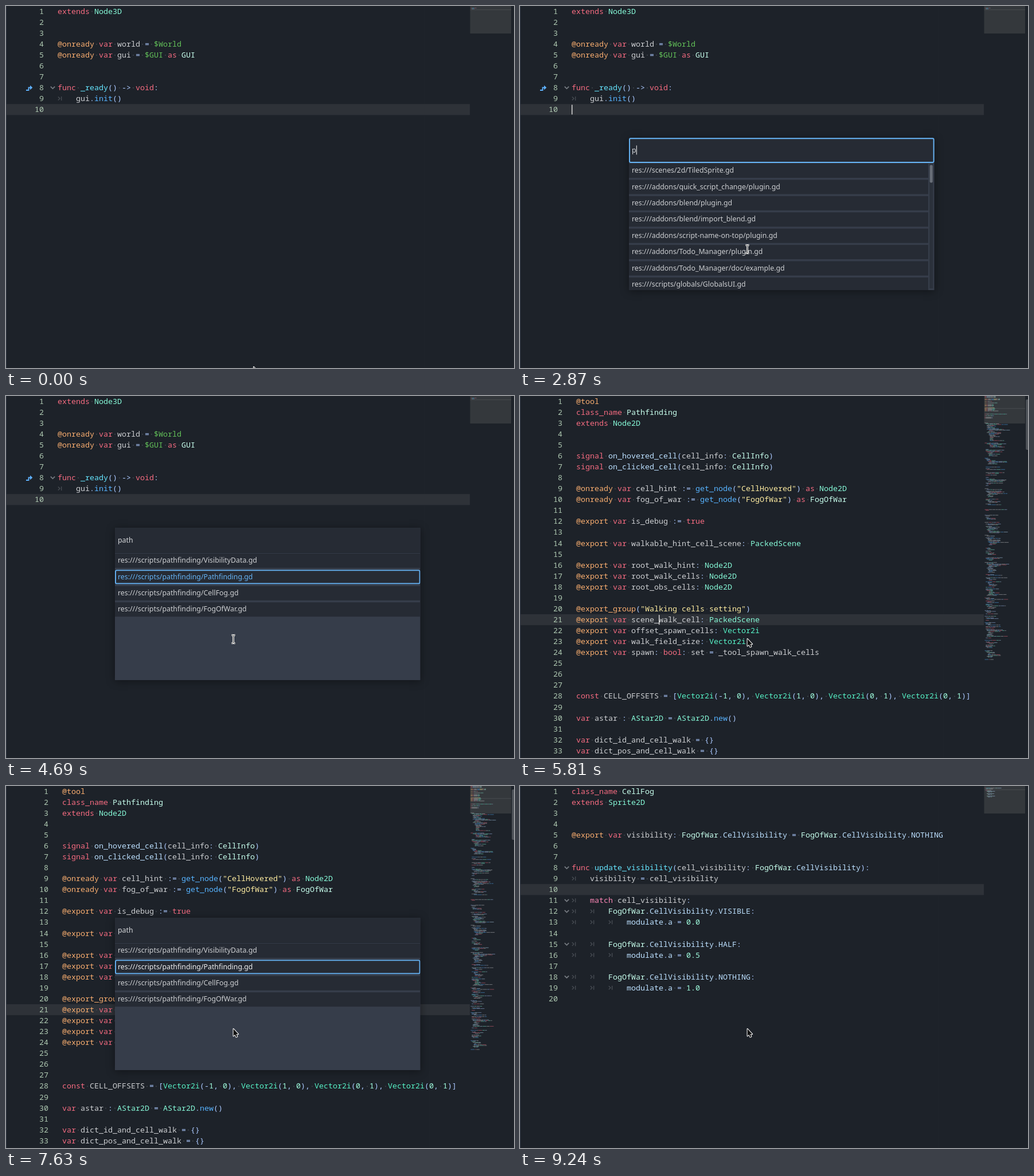
An HTML page with a canvas that plays this animation: 886x632 px, repeating every 9.31 s.

```html
<!DOCTYPE html>
<html lang="en">
<head>
<meta charset="utf-8">
<title>Quick script change</title>
<style>
  html, body { margin: 0; width: 100%; height: 100%; overflow: hidden; background: #1d2229; }
  canvas { display: block; }
</style>
</head>
<body>
<canvas id="stage" width="886" height="632"></canvas>
<script>
const ctx = document.getElementById('stage').getContext('2d');
const LOOP = 9310, TICK = 70;
const CHAR = 8, LINE = 19.07, TAB = 4;
const MONO = '13.333px "Noto Sans Mono", "DejaVu Sans Mono", monospace';
const SANS = '12.34px "Noto Sans", "Open Sans", sans-serif';

const C = {
  bg: '#1d2229', base: '#363d4a', field: '#262b34', accent: '#66b4f6',
  text: '#cdcfd2', keyword: '#f56b80', flow: '#fa85b4', base_type: '#56f2c6',
  engine: '#86fad8', user: '#c7ffed', string: '#ffeda1', symbol: '#abc9ff',
  call: '#57b3ff', def: '#66e6ff', member: '#bce0ff', number: '#a1ffe0',
  annotation: '#f8ad6f', node: '#63c259', lineNo: '#aec8b1', space: '#484d54'
};

const words = {};
const classify = (kind, list) => list.split(' ').forEach(w => { words[w] = kind; });
classify('keyword', 'extends class_name var as func void signal const true bool');
classify('flow', 'match');
classify('base_type', 'Vector2i');
classify('engine', 'Node2D Node3D Sprite2D PackedScene AStar2D');
classify('user', 'GUI Pathfinding CellInfo FogOfWar CellFog');
classify('member', 'modulate');

const files = [
  { x: 90, current: 10, caret: 0, folds: [8], override: 8, code: `extends Node3D


@onready var world = $World
@onready var gui = $GUI as GUI


func _ready() -> void:
	gui.init()
` },
  { x: 98, current: 21, caret: 18, folds: [], long: true, code: `@tool
class_name Pathfinding
extends Node2D


signal on_hovered_cell(cell_info: CellInfo)
signal on_clicked_cell(cell_info: CellInfo)

@onready var cell_hint := get_node("CellHovered") as Node2D
@onready var fog_of_war := get_node("FogOfWar") as FogOfWar

@export var is_debug := true

@export var walkable_hint_cell_scene: PackedScene

@export var root_walk_hint: Node2D
@export var root_walk_cells: Node2D
@export var root_obs_cells: Node2D

@export_group("Walking cells setting")
@export var scene_walk_cell: PackedScene
@export var offset_spawn_cells: Vector2i
@export var walk_field_size: Vector2i
@export var spawn: bool: set = _tool_spawn_walk_cells



const CELL_OFFSETS = [Vector2i(-1, 0), Vector2i(1, 0), Vector2i(0, 1), Vector2i(0, 1)]

var astar : AStar2D = AStar2D.new()

var dict_id_and_cell_walk = {}
var dict_pos_and_cell_walk = {}` },
  { x: 90, current: 10, caret: 0, folds: [8, 11, 12, 15, 18], code: `class_name CellFog
extends Sprite2D


@export var visibility: FogOfWar.CellVisibility = FogOfWar.CellVisibility.NOTHING


func update_visibility(cell_visibility: FogOfWar.CellVisibility):
	visibility = cell_visibility

	match cell_visibility:
		FogOfWar.CellVisibility.VISIBLE:
			modulate.a = 0.0

		FogOfWar.CellVisibility.HALF:
			modulate.a = 0.5

		FogOfWar.CellVisibility.NOTHING:
			modulate.a = 1.0
` }
];

function tokenize(line) {
  const tokens = [];
  let col = 0, word = '', before = '';
  for (const m of line.matchAll(/"[^"]*"|@\w+|\$\w+|\d+(?:\.\d+)?|\w+|\t| +|[^\w\s"@$]+/g)) {
    const s = m[0], next = line[m.index + s.length];
    let kind = 'text';
    if (s === '\t') kind = 'tab';
    else if (s[0] === ' ') kind = 'gap';
    else if (s[0] === '"') kind = 'string';
    else if (s[0] === '@') kind = 'annotation';
    else if (s[0] === '$') kind = 'node';
    else if (/^\d/.test(s)) kind = 'number';
    else if (!/^\w/.test(s)) kind = 'symbol';
    else if (word === 'func') kind = 'def';
    else if (word === 'signal') kind = 'member';
    else if (words[s]) kind = words[s];
    else if (next === '(') kind = 'call';
    else if (before === '.') kind = 'member';
    tokens.push({ s, kind, col });
    col += s === '\t' ? TAB : s.length;
    if (kind !== 'gap') { word = s; before = s.slice(-1); }
  }
  return tokens;
}
files.forEach(f => { f.lines = f.code.split('\n').map(tokenize); });

// Step tracks: [time, value]
const fileTrack = [[0, 0], [4830, 1], [8750, 2]];
const popupTrack = [[0, 0], [1050, 1], [4830, 0], [6230, 1], [8750, 0]];
const queryTrack = [[0, ''], [2870, 'p'], [3010, 'pa'], [3150, 'pat'], [3290, 'path']];
const focusTrack = [[0, -1], [3780, 0], [4270, 1], [6230, -1], [7420, 0], [7630, 1], [8050, 2]];
const pressTrack = [[0, 0], [4690, 1], [4830, 0], [8680, 1], [8750, 0]];
const caretTrack = [[0, 0], [770, 1], [1260, 0], [1820, 1], [2310, 0], [2870, 1], [3360, 0],
  [3920, 1], [4410, 0], [4830, 1], [5250, 0], [5810, 1], [6300, 0], [8750, 1], [9240, 0]];
const fieldCaretTrack = [[0, 1], [1540, 0], [2100, 1], [2590, 0], [2870, 1], [6720, 0], [7280, 1]];

function at(track, t) {
  let value = track[0][1];
  for (const [start, v] of track) if (start <= t) value = v;
  return value;
}

const broad = ['scenes/2d/TiledSprite', 'addons/quick_script_change/plugin', 'addons/blend/plugin',
  'addons/blend/import_blend', 'addons/script-name-on-top/plugin', 'addons/Todo_Manager/plugin',
  'addons/Todo_Manager/doc/example', 'scripts/globals/GlobalsUI'];
const narrow = ['VisibilityData', 'Pathfinding', 'CellFog', 'FogOfWar'].map(n => 'scripts/pathfinding/' + n);

function rect(x, y, w, h, color) {
  ctx.fillStyle = color;
  ctx.fillRect(x, y, w, h);
}

function text(s, x, y, color, font, align = 'left') {
  ctx.font = font;
  ctx.textAlign = align;
  ctx.fillStyle = color;
  ctx.fillText(s, x, y);
}

function stroke(points, color, width, close) {
  ctx.beginPath();
  points.forEach(([x, y]) => ctx.lineTo(x, y));
  if (close) ctx.closePath();
  ctx.strokeStyle = color;
  ctx.lineWidth = width;
  ctx.stroke();
}

function fill(points, color) {
  ctx.beginPath();
  points.forEach(([x, y]) => ctx.lineTo(x, y));
  ctx.fillStyle = color;
  ctx.fill();
}

const middle = n => 9 + (n - 1) * LINE;

function drawTab(x, y) {
  stroke([[x + .8, y - 3], [x + 4, y], [x + .8, y + 3]], C.space, 1.3);
  rect(x + 6, y - 3.5, 1.3, 7, C.space);
}

function drawLine(tokens, x0, y) {
  for (const { s, kind, col } of tokens) {
    const x = x0 + col * CHAR;
    if (kind === 'tab') { drawTab(x, y); continue; }
    if (kind !== 'gap') text(s, x, y + 4.6, C[kind], MONO);
    [...s].forEach((c, i) => {
      if (c === ' ') rect(x + i * CHAR + 3.2, y - .3, 1.6, 1.6, C.space);
    });
  }
}

function drawOverride(y) {
  stroke([[35, y + 4.5], [39.5, y + 4.5], [39.5, y], [43, y]], '#5fb2ff', 1.8);
  fill([[42, y - 4], [46.3, y], [42, y + 4]], '#5fb2ff');
}

// Body of the long script, visible only in the minimap
function drawMinimapRest(mx, rowY) {
  let seed = 7;
  const rnd = () => (seed = seed * 16807 % 2147483647) / 2147483647;
  const kinds = ['text', 'member', 'call', 'text', 'engine', 'symbol', 'keyword'];
  let depth = 0;
  for (let n = 37; n < 335; n++) {
    const r = rnd();
    if (r < .08) { depth = 0; n++; continue; }
    if (r < .25) { depth = 1; continue; }
    let x = mx + depth * TAB * .45;
    const end = x + 4 + rnd() * rnd() * 36;
    while (x < end) {
      const w = 1.5 + rnd() * 6;
      rect(x, rowY(n), w, .9, C[kinds[Math.floor(rnd() * kinds.length)]]);
      x += w + .6;
    }
    depth = Math.max(1, Math.min(5, depth + Math.floor(rnd() * 3) - (depth > 2 ? 1 : 0)));
  }
}

function drawMinimap(f) {
  const mx = 810.5, scale = .45;
  const rowY = n => 6 + (n - 10) * 1.4;
  rect(809.5, 0, 71.5, 48, '#34383c');
  rect(809.5, rowY(f.current) - .2, 71.5, 1.3, 'rgba(255,255,255,.08)');
  ctx.globalAlpha = .52;
  f.lines.forEach((tokens, i) => {
    for (const { s, kind, col } of tokens)
      if (C[kind]) rect(mx + col * scale, rowY(i + 1), s.length * scale, .9, C[kind]);
  });
  if (f.long) drawMinimapRest(mx, rowY);
  ctx.globalAlpha = 1;
  if (f.long) {
    ctx.beginPath();
    ctx.roundRect(882.3, 6, 5, 88, 2);
    ctx.fillStyle = '#50545a';
    ctx.fill();
  }
}

function drawEditor(f, caretOn) {
  rect(0, 0, 886, 632, C.bg);
  rect(0, 0, 1, 632, '#333a45');
  rect(f.x + 640, 0, 1, 632, '#1f242b');
  rect(1, middle(f.current) - 9.4, 808, LINE, '#2e3238');
  f.lines.forEach((tokens, i) => {
    const y = middle(i + 1);
    text(i + 1, f.x - 24, y + 4.6, C.lineNo, MONO, 'right');
    drawLine(tokens, f.x, y);
  });
  f.folds.forEach(n => {
    const y = middle(n);
    stroke([[77.8, y - 1.8], [81.5, y + 1.8], [85.2, y - 1.8]], '#757a80', 1.8);
  });
  if (f.override) drawOverride(middle(f.override));
  if (caretOn) rect(f.x + f.caret * CHAR, middle(f.current) - 8.2, 1.4, 17, '#e0e0e0');
  drawMinimap(f);
}

function focusRing(y, h) {
  ctx.beginPath();
  ctx.roundRect(191, y + 1, 530.6, h - 2, 2);
  ctx.strokeStyle = C.accent;
  ctx.lineWidth = 1.9;
  ctx.stroke();
}

function drawPopup(query, focus, pressed, caretOn) {
  const x = 190, y = 230.3, w = 532.5, h = 265.7;
  ctx.save();
  ctx.shadowColor = 'rgba(0,0,0,.4)';
  ctx.shadowBlur = 14;
  ctx.shadowOffsetY = 2;
  rect(x, y, w, h, C.base);
  ctx.restore();

  rect(x, y, w, 43.7, C.field);
  text(query, 195, 256, '#d5d7da', SANS);
  if (focus < 0) {
    focusRing(y, 43.7);
    if (caretOn) rect(195.2 + ctx.measureText(query).width, 243.5, 1.2, 16, '#d8d8d8');
  } else rect(x, 273, w, 1, '#20252d');

  const wide = query.length === 1;
  const rows = !query ? [] : wide ? broad : narrow;
  ctx.save();
  ctx.beginPath();
  ctx.rect(x, 274, w, 222);
  ctx.clip();
  rows.forEach((name, i) => {
    const top = 275 + i * 28.42, on = i === focus;
    rect(x, top, wide ? 522 : w, 25, C.field);
    if (on) focusRing(top, 25);
    const color = !on ? C.text : pressed ? C.accent : '#eeeff0';
    text('res:///' + name + '.gd', 195, top + 16.2, color, SANS);
  });
  if (wide) {
    rect(714.2, 276, 6, 217, '#2b313b');
    ctx.beginPath();
    ctx.roundRect(714.7, 277.5, 5, 31, 2);
    ctx.fillStyle = '#686e78';
    ctx.fill();
  }
  ctx.restore();
}

function drawArrow(x, y) {
  const shape = [[0, 0], [0, 12.4], [2.8, 9.9], [4.8, 14.4], [6.8, 13.5], [5, 9.2], [8.6, 9.2]]
    .map(([dx, dy]) => [x + dx, y + dy]);
  ctx.lineJoin = 'round';
  stroke(shape, '#fff', 2, true);
  ctx.lineJoin = 'miter';
  fill(shape, '#111');
}

function drawBeam(x, y) {
  for (const [color, width] of [['#fff', 3], ['#222', 1]]) {
    stroke([[x - 3.2, y - 7], [x - 1.2, y - 7], [x, y - 5.8], [x + 1.2, y - 7], [x + 3.2, y - 7]], color, width);
    stroke([[x, y - 6], [x, y + 6]], color, width);
    stroke([[x - 3.2, y + 7], [x - 1.2, y + 7], [x, y + 5.8], [x + 1.2, y + 7], [x + 3.2, y + 7]], color, width);
  }
}

function drawPointer(t) {
  if (t < TICK) return drawArrow(432, 630);
  if (t >= 4900) return drawArrow(396.6, 424);
  const left = Math.pow(1 - Math.min(1, t / 490), 2.5);
  drawBeam(396.5 + 35.5 * left, 424.5 + 211 * left);
}

function draw(now) {
  const t = Math.floor((now % LOOP) / TICK) * TICK;
  drawEditor(files[at(fileTrack, t)], at(caretTrack, t));
  if (at(popupTrack, t))
    drawPopup(at(queryTrack, t), at(focusTrack, t), at(pressTrack, t), at(fieldCaretTrack, t));
  drawPointer(t);
}

const start = performance.now();
function frame() {
  draw(performance.now() - start);
  requestAnimationFrame(frame);
}
frame();
</script>
</body>
</html>
```
